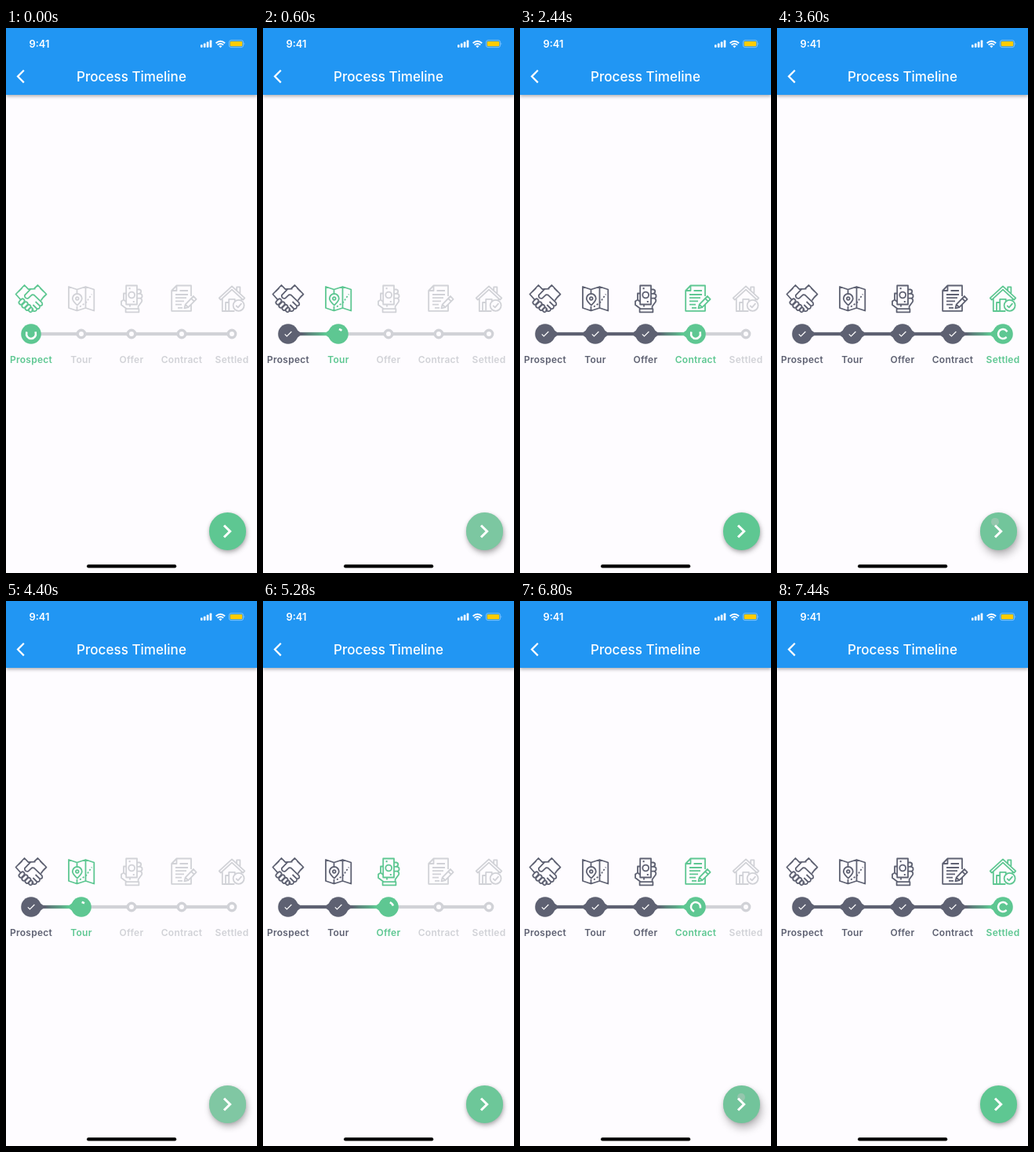
Write an HTML page that moves like this. It is 320 by 693 pixels and loops after 7480 ms.

```html
<!DOCTYPE html>
<html lang="en">
<head>
<meta charset="utf-8">
<title>Process Timeline</title>
<style>
  html, body { margin: 0; width: 100%; height: 100%; overflow: hidden; background: #fefcff; }
  body { position: relative; font-family: Inter, Roboto, sans-serif; }
  svg { position: absolute; left: 0; top: 0; display: block; }
  .bar { position: absolute; left: 0; top: 0; width: 320px; height: 85.3px; background: #2196f3;
         box-shadow: 0 1.5px 4px rgba(0, 0, 0, .3); }
  .fab { position: absolute; left: 258.5px; top: 616.1px; width: 47.8px; height: 47.8px;
         border-radius: 50%; background: #5ec792; }
  .ink { position: absolute; inset: 0; border-radius: 50%; overflow: hidden; }
  .glow { position: absolute; inset: 0; background: #bcbcbc; opacity: 0; }
  .splash { position: absolute; border-radius: 50%; background: #c8c8c8; opacity: 0; }
  .label { font-size: 12px; font-weight: 600; letter-spacing: .25px; text-anchor: middle; }
  .icon { fill: none; stroke-width: 1.8; stroke-linejoin: round; }
</style>
</head>
<body>
<div class="bar"></div>
<div class="fab" id="fab"><div class="ink"><div class="glow" id="glow"></div><div class="splash" id="splash"></div></div></div>
<svg width="320" height="693" viewBox="0 0 320 693">
  <g fill="#fff">
    <text x="29.5" y="25" font-size="12.8" font-weight="600">9:41</text>
    <text x="160" y="67.5" font-size="17.07" font-weight="500" text-anchor="middle">Process Timeline</text>
    <rect x="248" y="21.2" width="2.6" height="3.6" rx=".7"/>
    <rect x="251.9" y="19.5" width="2.6" height="5.3" rx=".7"/>
    <rect x="255.8" y="17.6" width="2.6" height="7.2" rx=".7"/>
    <rect x="259.7" y="15.6" width="2.6" height="9.2" rx=".7"/>
    <path d="M273.4 25.2l-2.1-2.2q2.1-1.7 4.2 0z"/>
  </g>
  <g fill="none" stroke="#fff">
    <path d="M267.6 19.2q5.8-5 11.6 0M269.6 21.5q3.8-3.1 7.6 0" stroke-width="1.8"/>
    <rect x="284.4" y="15.6" width="18.2" height="9" rx="2.6" stroke-width=".8" opacity=".5"/>
    <path d="M22.8 53.8L15 61.6L22.8 69.4" stroke-width="2.2"/>
    <path d="M278 632.5L285.6 640L278 647.5" stroke-width="3.1"/>
  </g>
  <rect x="285.7" y="16.9" width="15.6" height="6.4" rx="1.4" fill="#ffcc00"/>
  <path d="M303.6 18.5q1.4 1.6 0 3.2z" fill="#fff" opacity=".55"/>
  <rect x="103" y="682.3" width="114.3" height="4.2" rx="2.1"/>
  <g id="track"></g>
  <path id="spin" fill="none" stroke="#fff" stroke-width="2.56" stroke-linecap="square"/>
</svg>
<script>
const LOOP = 7480, TICK = 40, UNIT = 320 / 375;
const DONE = '#5e6172', NOW = '#5ec792', TODO = '#d1d2d7', PAPER = '#fefcff';
const MID = 389, BIG = 15 * UNIT, SMALL = 7.5 * UNIT;
const LABELS = ['Prospect', 'Tour', 'Offer', 'Contract', 'Settled'];

// time of each tap's release, and where the finger was
const FIRST = -330;
const TAPS = [
  [510, 281, 631], [1312, 285, 626], [2110, 283, 629],
  [2980, 280, 630], [3625, 278, 628], [4322, 280, 631],
  [5150, 283, 630], [6010, 281, 629], [6820, 282, 631]
];
const HOLD = 130, FADE = 200;

const capsule = (x, y, h) =>
  `<rect x="-2.4" y="${-h / 2}" width="4.8" height="${h}" rx="2.4" transform="translate(${x} ${y}) rotate(45)"/>`;
const path = (d, extra = '') => `<path d="${d}" ${extra}/>`;

const ICONS = [
  path('M-15.5-1L-19.5-5.5L-8.5-17L-3.5-11.8L-.5-12.2M-11.5-13.5L-16-9' +
       'M3.8-12.5L8.5-17L19.5-5.5L15-1M11.5-13.5L16-9' +
       'M5.5-12.3L-.5-12.2L-8.2-4.2Q-8.5.6-3.6-.4L1.2-4.8L3.6-4.6L13.8 5.2Q15.6 9.2 11.2 9.4L5.6 4' +
       'M11.2 9.4Q11.6 13.6 7.4 13L2.4 8M7.4 13Q6.8 17.2 2.8 15.8L.6 13.8M-15.5-1L-13.4 1.4M15-1L12.6 2.6') +
  capsule(-12, 4, 8) + capsule(-8, 8, 8.5) + capsule(-4, 11.4, 8) + capsule(-.4, 14.4, 5.6),

  path('M-16-15L-5.5-11.5L5.5-15L16.3-11.5V15.5L5.5 12L-5.5 15.5L-16 12ZM-5.5-11.5V-6M-5.5 10V15.5M5.5-15V12') +
  path('M-5.2 8.6Q-11.2 3-11.2 0A6 6 0 0 1 .8 0Q.8 3-5.2 8.6Z') +
  '<circle cx="-5.2" cy="0" r="1.8"/>' +
  path('M-2 10.5L2.5 7.5L7.5 4L9 .5L13.5-5.5', 'stroke-dasharray="2.2 2.2"'),

  path('M-6.8-16.5H7V7.5H-6.8Z') +
  '<circle cx=".2" cy="-4.5" r="3.9"/>' +
  path('M-3.4-12.8h2M1.8 4h2', 'stroke-width="2.2"') +
  path('M7-11.5H10Q12.4-11.2 12.2-8.6Q12-6.4 9.4-6.2H7M10-6.2Q13.8-6 13.6-2.8Q13.4-.2 10-.3H7' +
       'M11-.3Q14.2 1 13 4L8.6 10V13.2M-6.8-6.5H-10V1.5L-13 3.5V8L-6 13.2M-10 1.5L-6.8 4M-7.4 13.2H9.4V17.3H-7.4ZM-2 7.5V10.5'),

  path('M12-3V-16.5H-6.5L-12.8-10V15.8H12V8M-6.5-16.5V-10H-12.8') +
  path('M-2.5-10H8M-8-5H8M-8-.8H6M-8 3.4H3M-8 7.6H0M-5 11.8H1') +
  path('M4.6 7.6L15-3L18.6.8L8.4 11.2L3.4 12.4ZM12.2-.2L15.8 3.6M4.6 7.6L8.4 11.2'),

  path('M-16.3-.6L0-15.6L16.3-.6L14.2 1.6L0-11.4L-14.2 1.6ZM6.2-10V-14.6H10.4V-6' +
       'M-12.2 0V16H3.4M12.2 0V2.2M-3.8 16V.8H3.8V4.6M-8 16V5H-3.8') +
  '<circle cx="8.6" cy="8.8" r="7"/>' + path('M5.2 8.8L7.8 11.4L12.4 6.2')
];

const $ = id => document.getElementById(id);
const xOf = i => 32 + 64 * i;
const colorOf = (i, step) => i < step ? DONE : i === step ? NOW : TODO;

// teardrop joining a dot to its line; side is -1 or 1
function flare(r, side) {
  const k = r * Math.SQRT1_2, s = side * k, edge = side * r;
  return path(`M${s} ${-k}Q${edge} 0 ${2 * edge} 0Q${edge} 0 ${s} ${k}Z`);
}

function dot(i, step) {
  const c = colorOf(i, step), active = i <= step, r = active ? BIG : SMALL;
  let out = '';
  if (i > 0) out += flare(r, -1);
  if (active ? i < step : i < 4) out += flare(r, 1);
  out += active
    ? `<circle r="${BIG}"/>`
    : `<circle r="${SMALL - 2 * UNIT}" fill="${PAPER}" stroke="${c}" stroke-width="${4 * UNIT}"/>`;
  if (i < step) out += path('M-4.2.4L-1.6 3L4.4-3', 'fill="none" stroke="#fff" stroke-width="1.2"');
  return `<g transform="translate(${xOf(i)} ${MID})" fill="${c}">${out}</g>`;
}

function drawTrack(step) {
  const x = xOf(step);
  let out = `<linearGradient id="blend" gradientUnits="userSpaceOnUse" x1="${x - 64 + BIG}" y1="0" x2="${x - BIG}" y2="0">
    <stop stop-color="${DONE}"/><stop offset="1" stop-color="${NOW}"/></linearGradient>`;
  for (let i = 1; i < 5; i++) {
    const fill = i === step ? 'url(#blend)' : colorOf(i, step);
    out += `<rect x="${xOf(i - 1)}" y="${MID - 2.5 * UNIT}" width="64" height="${5 * UNIT}" fill="${fill}"/>`;
  }
  LABELS.forEach((label, i) => {
    const c = colorOf(i, step);
    out += dot(i, step) +
      `<g class="icon" stroke="${c}" transform="translate(${xOf(i)} 344)">${ICONS[i]}</g>` +
      `<text class="label" x="${xOf(i)}" y="426" fill="${c}">${label}</text>`;
  });
  $('track').innerHTML = out;
}

const clamp = v => Math.max(0, Math.min(1, v));

// cubic-bezier(.4, 0, .2, 1)
function ease(x) {
  if (x <= 0 || x >= 1) return clamp(x);
  let lo = 0, hi = 1, p;
  for (let n = 0; n < 24; n++) {
    p = (lo + hi) / 2;
    const at = 1.2 * p * (1 - p) ** 2 + .6 * p * p * (1 - p) + p ** 3;
    if (at < x) lo = p; else hi = p;
  }
  return 3 * p * p * (1 - p) + p ** 3;
}

function drawSpinner(step, age) {
  const phase = age / 1333 % 1, turn = Math.PI * 2;
  const head = ease(phase * 2), tail = ease(phase * 2 - 1);
  const from = turn * (-.25 + .75 * tail + age / 2222 + .25 * phase);
  const to = from + Math.max(.01, .75 * turn * (head - tail));
  const r = 7 * UNIT;
  const point = a => `${xOf(step) + r * Math.cos(a)} ${MID + r * Math.sin(a)}`;
  $('spin').setAttribute('d', `M${point(from)}A${r} ${r} 0 ${to - from > Math.PI ? 1 : 0} 1 ${point(to)}`);
}

function drawButton(t) {
  const tap = TAPS.find(([at]) => t >= at - HOLD && t < at + FADE);
  let lift = 0, radius = 0, alpha = 0;
  if (tap) {
    const u = t - tap[0];
    lift = u < 0 ? (u + HOLD) / FADE : clamp((HOLD - u) / FADE);
    radius = u < 0 ? 5.8 * (u + HOLD) / HOLD : 5.8 + u * .95;
    alpha = .4 * (u < 0 ? 1 : 1 - u / FADE);
    $('splash').style.cssText = `left:${tap[1] - 258.5 - radius}px;top:${tap[2] - 616.1 - radius}px;` +
      `width:${2 * radius}px;height:${2 * radius}px;opacity:${alpha}`;
  } else {
    $('splash').style.opacity = 0;
  }
  $('glow').style.opacity = .4 * lift;
  const rise = clamp(lift / .65);
  $('fab').style.boxShadow =
    `${1 + 1.5 * rise}px ${3 + 4 * rise}px ${6 + 6 * rise}px rgba(0,0,0,.27), 0 1px 4px rgba(0,0,0,.12)`;
}

let shown = -1;
const start = performance.now();

function frame() {
  const t = Math.floor((performance.now() - start) % LOOP / TICK) * TICK;
  const count = TAPS.filter(([at]) => at <= t).length;
  const step = count % 5;
  if (step !== shown) drawTrack(shown = step);
  drawSpinner(step, t - (count ? TAPS[count - 1][0] : FIRST));
  drawButton(t);
  requestAnimationFrame(frame);
}
frame();
</script>
</body>
</html>
```
